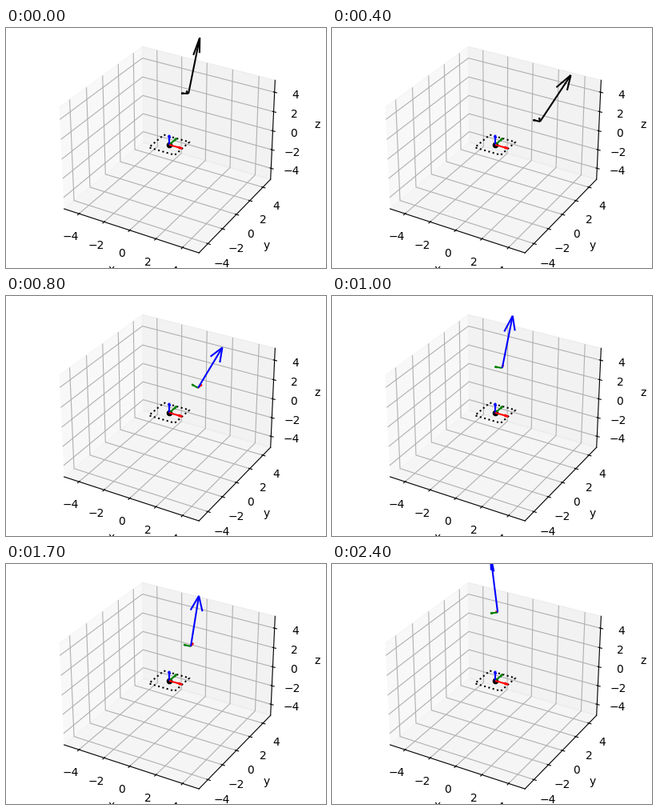
These frames come from a looping animation (400x300 px, 2500 ms). A matplotlib script:

```python
import numpy as np
import matplotlib.pyplot as plt
from matplotlib.animation import FuncAnimation

FRAMES, STEP = 25, 100
BLACK_FRAMES = 6
LIM = 5 * 25 / 24
AXIS_LEN = np.array([0.5, 0.5, 5.0])

# step, x, z, tilt towards x, tilt towards y
KEYS = np.array([
    [0, 0.44, 4.25, 0.02, 0.26],
    [4, 2.64, 2.46, 0.335, 0.20],
    [8, 2.30, 3.53, 0.36, -0.03],
    [13, -1.92, 4.88, -0.21, 0.32],
    [15, 1.36, 5.35, 0.10, 0.12],
    [17, 1.48, 3.88, 0.09, 0.04],
    [20, -1.21, 2.24, -0.01, 0.04],
    [22, -1.81, 3.58, -0.22, 0.12],
    [24, -0.90, 5.47, -0.27, 0.27],
])
TIMES, POSES = KEYS[:, 0], KEYS[:, 1:]
SLOPES = np.gradient(POSES, TIMES, axis=0)


def unit(v):
    return v / np.linalg.norm(v)


def smooth(t):
    """Cubic Hermite interpolation of the key poses."""
    i = min(np.searchsorted(TIMES, t, side="right") - 1, len(TIMES) - 2)
    h = TIMES[i + 1] - TIMES[i]
    s = (t - TIMES[i]) / h
    return ((1 + 2 * s) * (1 - s) ** 2 * POSES[i]
            + s * (1 - s) ** 2 * h * SLOPES[i]
            + s * s * (3 - 2 * s) * POSES[i + 1]
            + s * s * (s - 1) * h * SLOPES[i + 1])


def pose(t):
    """Origin and right-handed axes; sway in y and yaw follow the y tilt."""
    px, pz, tx, ty = smooth(t)
    yaw = np.radians(5 + 150 * ty)
    z = np.array([tx, ty, np.sqrt(1 - tx * tx - ty * ty)])
    y = unit(np.cross(z, [-np.sin(yaw), np.cos(yaw), 0]))
    return (px, 7 * ty, pz), np.array([np.cross(y, z), y, z])


def draw_axes(origin, vectors, colors):
    return [ax.quiver(*origin, *v, color=c) for v, c in zip(vectors, colors)]


fig = plt.figure(figsize=(4, 3), dpi=100)
ax = fig.add_axes((0, 0, 1, 1), projection="3d")
ax.set(xlim=(-LIM, LIM), ylim=(-LIM, LIM), zlim=(-LIM, LIM),
       xlabel="x", ylabel="y", zlabel="z")

ax.plot([-1, 1, 1, -1, -1], [1, 1, -1, -1, 1], [0] * 5, "k:")
ax.scatter([0], [0], [0], color="k")
draw_axes((0, 0, 0), np.eye(3), "rgb")

moving = []


def update(i):
    while moving:
        moving.pop().remove()
    origin, axes = pose(i)
    colors = "kkk" if i < BLACK_FRAMES else "rgb"
    moving.extend(draw_axes(origin, axes * AXIS_LEN[:, None], colors))
    return moving


anim = FuncAnimation(fig, update, frames=FRAMES, interval=STEP,
                     repeat=True, repeat_delay=0, blit=False)
plt.show()
```
